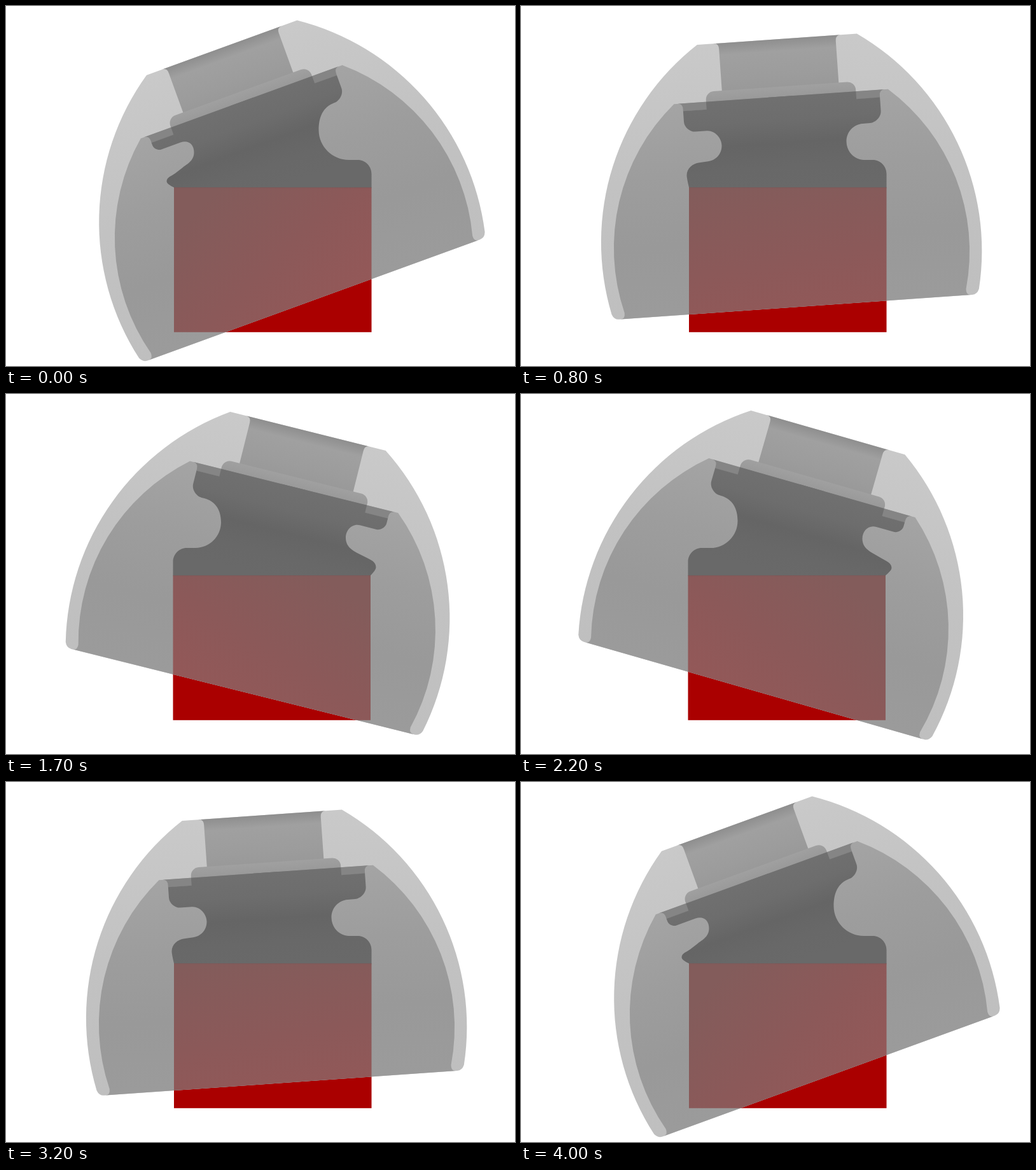
Write an HTML page with a canvas that moves like this. It is 800 by 566 pixels and loops after 4.1 s.

```html
<!DOCTYPE html>
<html lang="en">
<head>
<meta charset="utf-8">
<title>Tilting shell</title>
<style>
  html, body { margin: 0; width: 100%; height: 100%; overflow: hidden; background: #fff; }
  canvas { display: block; }
</style>
</head>
<body>
<canvas id="stage" width="800" height="566"></canvas>
<script>
const ctx = document.getElementById('stage').getContext('2d');
const RAD = Math.PI / 180;
const CENTER = [418.5, 283.4];
const BOTTOM = 190.4;
const BLOCK_TOP = 1.8;

function gradient(x0, y0, x1, y1, ...colors) {
  const g = ctx.createLinearGradient(x0, y0, x1, y1);
  colors.forEach((color, i) => g.addColorStop(i / (colors.length - 1), color));
  return g;
}

// Symmetric dome with circular flanks; (cx, cy, r) is the circle of the left flank.
function dome({ cx, cy, r, top, end, cornerX, footX }) {
  const a = Math.asin((top - cy) / r), b = Math.asin((end - cy) / r);
  ctx.beginPath();
  ctx.arc(-cx, cy, r, a, b);
  ctx.quadraticCurveTo(cornerX, BOTTOM, footX, BOTTOM);
  ctx.lineTo(-footX, BOTTOM);
  ctx.quadraticCurveTo(-cornerX, BOTTOM, cx - r * Math.cos(b), end);
  ctx.arc(cx, cy, r, Math.PI - b, Math.PI - a);
  ctx.closePath();
}
const outer = { cx: 96, cy: 95, r: 395, top: -231.8, end: 182, cornerX: 286, footX: 278 };
const inner = { cx: 38.5, cy: 100, r: 318, top: -141.3, end: 181, cornerX: 268.5, footX: 276 };

// Band whose upper ends flare outwards.
function flaredBand(half, top, bottom) {
  ctx.beginPath();
  ctx.moveTo(-half - 8, top);
  ctx.lineTo(half + 8, top);
  ctx.quadraticCurveTo(half, top, half, top + 9);
  ctx.lineTo(half, bottom);
  ctx.lineTo(-half, bottom);
  ctx.lineTo(-half, top + 9);
  ctx.quadraticCurveTo(-half, top, -half - 8, top);
  ctx.fill();
}

// Right half of the dark gap; `open` is how many degrees this side is pulled apart.
function halfGap(open) {
  const squeeze = Math.max(0, -open);
  const cos = Math.cos(open * RAD), sin = -Math.sin(open * RAD);
  const tilt = (x, y) => [x * cos - y * sin, x * sin + y * cos];

  const lipY = -90 - 1.5 * squeeze + 0.015 * squeeze ** 2;
  const lipR = 18 - 0.35 * squeeze;
  const lobeX = 122 + (open > 0 ? 0.75 : 0.5) * open;
  const tip = [98 - 1.25 * open, -66.4 - (open > 0 ? 1.1 : 0.65) * open];
  const slope = 1.9 * squeeze * RAD;
  const tx = Math.cos(slope), ty = Math.sin(slope);
  const shoulder = [134.5 + 0.9 * squeeze, -41.4 + 1.05 * squeeze];
  const end = [shoulder[0] - 14 * tx, shoulder[1] - 14 * ty];
  const elbow = [156 + 0.5 * squeeze, -19.4 + 0.6 * squeeze];
  const reach = end[0] - tip[0];
  const bulge = 4 / 3 * Math.tan((90 - open) / 4 * RAD) * reach;
  const bend = 0.55 * (elbow[0] - shoulder[0]);

  ctx.fillStyle = gradient(...tilt(0, -141), ...tilt(0, 5),
    '#707070', '#6d6d6d', '#656565', '#686868', '#696969');
  ctx.beginPath();
  ctx.moveTo(...tilt(-20, -141.3));
  ctx.lineTo(...tilt(118, -141.3));
  ctx.lineTo(...tilt(118, -129.3));
  ctx.lineTo(...tilt(155, -129.3));
  ctx.lineTo(...tilt(155, lipY - lipR));
  ctx.bezierCurveTo(...tilt(155, lipY - lipR * 0.45), ...tilt(155 - lipR * 0.55, lipY),
    ...tilt(155 - lipR, lipY));
  ctx.lineTo(...tilt(lobeX, lipY));
  ctx.bezierCurveTo(...tilt(lobeX - bulge, lipY), tip[0], tip[1] - bulge, ...tip);
  ctx.bezierCurveTo(tip[0], tip[1] + 0.55 * (end[1] - tip[1]),
    end[0] - 0.55 * reach * tx, end[1] - 0.55 * reach * ty, ...end);
  ctx.lineTo(...shoulder);
  ctx.bezierCurveTo(shoulder[0] + bend * tx, shoulder[1] + bend * ty,
    elbow[0], elbow[1] - 0.55 * (elbow[1] - shoulder[1]), ...elbow);
  ctx.quadraticCurveTo(elbow[0], elbow[1] + 4, open < 0 ? 154.5 : 156, BLOCK_TOP);
  ctx.lineTo(-20, BLOCK_TOP);
  ctx.fill();
}

function draw(degrees) {
  const angle = degrees * RAD;
  const blockX = degrees > 0 ? -156 : -154.5;
  ctx.setTransform(1, 0, 0, 1, 0, 0);
  ctx.fillStyle = '#fff';
  ctx.fillRect(0, 0, 800, 566);
  ctx.translate(...CENTER);

  ctx.fillStyle = '#a00';
  ctx.fillRect(blockX, BLOCK_TOP, 310.5, 227.6);

  ctx.save();
  ctx.rotate(angle);
  dome(outer);
  ctx.fillStyle = gradient(0, -232, 0, 191, '#c9c9c9', '#c2c2c2', '#bfbfbf');
  ctx.fill();

  ctx.fillStyle = gradient(0, -232, 0, -156, '#8e8e8e', '#a0a0a0', '#9e9e9e', '#9c9c9c', '#999');
  flaredBand(92, -231.8, -150);
  ctx.fillStyle = gradient(0, -157, 0, -135, '#a0a0a0', '#979797');
  ctx.beginPath();
  ctx.roundRect(-118, -157, 236, 40, 13);
  ctx.fill();

  dome(inner);
  ctx.fillStyle = gradient(0, -141, 0, 191, '#a4a4a4', '#9d9d9d', '#999', '#9b9b9b');
  ctx.fill();
  ctx.fillStyle = '#858585';
  flaredBand(155, -141.3, -129);
  ctx.restore();

  halfGap(-degrees);
  ctx.save();
  ctx.scale(-1, 1);
  halfGap(degrees);
  ctx.restore();

  // Block seen through the shell
  ctx.save();
  ctx.rotate(angle);
  dome(outer);
  ctx.clip();
  ctx.rotate(-angle);
  const gx = 150 * Math.sin(-2 * angle), gy = 130 * Math.cos(2 * angle);
  ctx.fillStyle = gradient(-gx, 115 - gy, gx, 115 + gy, '#835c5b', '#8b5959', '#945858');
  ctx.fillRect(blockX, BLOCK_TOP, 310.5, 227.6);
  ctx.fillStyle = '#7b5858';
  ctx.fillRect(blockX, BLOCK_TOP, 310.5, 1);
  ctx.restore();
}

// Two degrees per 100 ms: -20 to 20 and back
function tick() {
  const step = Math.floor(performance.now() / 100) % 41;
  draw(20 - 2 * Math.abs(20 - step));
  requestAnimationFrame(tick);
}
tick();
</script>
</body>
</html>
```
